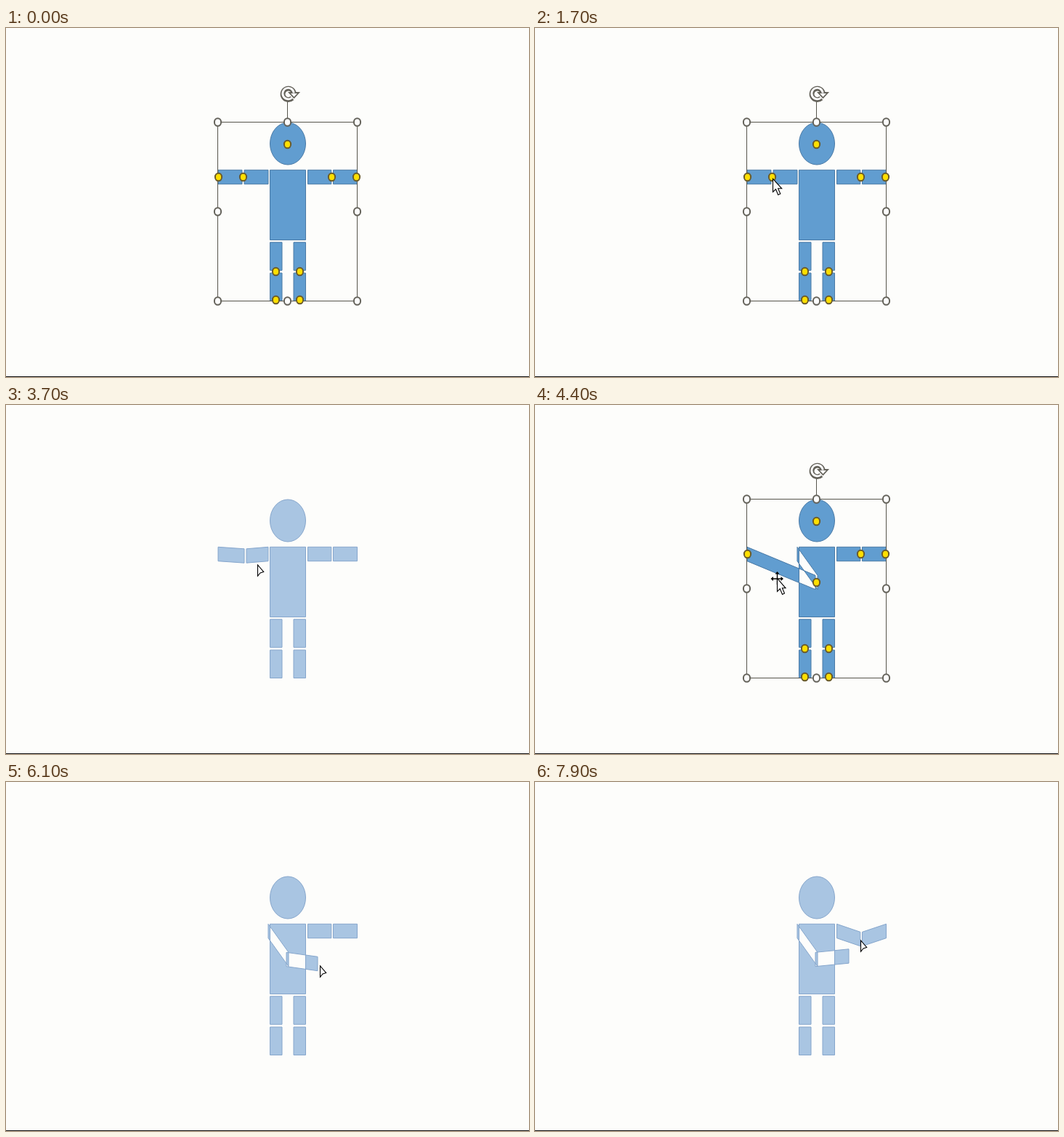
These frames come from a looping animation (720x480 px, 8000 ms). An HTML page:

```html
<!DOCTYPE html>
<html lang="en">
<head>
<meta charset="utf-8">
<title>Posing a figure</title>
<style>
  html, body { margin: 0; width: 100%; height: 100%; overflow: hidden; background: #fdfdfb; }
  svg { display: block; width: 720px; height: 480px; }
  #figure { fill: #619dd0; stroke: #4a7aa6; fill-rule: evenodd; }
  #figure.dragging { fill: #a9c5e2; stroke: #86a6cc; }
  .frame { fill: none; stroke: #57554c; }
  .knob { fill: #fdfdfd; stroke: #64625a; stroke-width: 2; }
  .yellow { fill: #ffdf00; stroke: #6b5c2c; }
  .pointer { fill: #fdfdfd; stroke: #000; stroke-width: 1.1; }
</style>
</head>
<body>
<svg viewBox="0 0 720 480">
  <rect y="479" width="720" height="1" fill="#111"/>
  <path id="figure"/>
  <g id="editor">
    <path class="frame" d="M291.5 129.5H483.5V375.5H291.5ZM387.5 129V102"/>
    <g fill="none">
      <path d="M394 96.5A7.7 7.7 0 1 1 396.2 89" stroke="#64625a" stroke-width="6.8"/>
      <path d="M390 89H403L396.5 96Z" fill="#fdfdfd" stroke="#64625a" stroke-width="1.8"/>
      <path d="M393.5 96A7.7 7.7 0 1 1 396.2 89.5" stroke="#fdfdfd" stroke-width="2.8"/>
    </g>
    <g id="knobs"></g>
  </g>
  <g id="cursor">
    <path class="pointer" data-kind="arrow" d="M.5 .5V18.5L4.5 14.8L7.7 22.4L10.8 21L7.6 13.8H12.7Z"/>
    <path class="pointer" data-kind="head" d="M.5 1V16.3L4 12L8.7 10.5Z"/>
    <g data-kind="move">
      <path d="M-7 1H8M.5 -7V9" stroke="#000" stroke-width="1.4"/>
      <path d="M-8.5 1L-5 -2V4ZM9 1L5.5 -2V4ZM.5 -9L-2.5 -5.5H3.5Z"/>
      <path class="pointer" d="M.5 .5V18.5L4.3 14.8L7.5 22.4L10.5 21L7.4 13.8H12Z"/>
    </g>
  </g>
</svg>
<script>
const LOOP = 8000, STEP = 100, HALF = 9.7;
const byId = id => document.getElementById(id);
const figure = byId('figure'), editor = byId('editor'), cursor = byId('cursor');

// Each stop: time, x, y and, for the cursor, its look from then on.
const cursorPath = [
  [200, 488, 441, 'arrow'], [600, 420, 302, 'arrow'], [1000, 332, 204, 'arrow'],
  [1200, 385, 162, 'arrow'], [1400, 412, 361, 'arrow'], [1700, 327, 207, 'arrow'],
  [2000, 327, 207, 'arrow'], [2400, 362, 224, 'move'], [2700, 370, 227, 'move'],
  [2800, 370, 227, 'move'], [3200, 327, 206, 'head'], [3500, 327, 206, 'head'],
  [3700, 346, 219, 'head'], [4000, 387, 244, 'head'], [4200, 387, 244, 'move'],
  [4400, 333, 238, 'move'], [4600, 291, 208, 'move'], [4800, 292, 205, 'head'],
  [5200, 292, 205, 'head'], [5500, 310, 217, 'head'], [6100, 432, 252, 'head'],
  [6400, 434, 241, 'head'], [6700, 434, 241, 'arrow'], [7300, 448, 206, 'head'],
  [7600, 448, 206, 'head'], [7900, 448, 217, 'head']
];
const elbowPath = [[3500, 326.5, 205], [3700, 329.5, 207.5], [4100, 387.5, 244]];
const wristPath = [[5200, 292, 205], [5500, 308, 214], [6100, 429, 250], [6400, 432, 239.5]];
const rightElbowPath = [[7600, 449, 205], [7900, 449, 216]];
const drags = [[3500, 4200], [5200, 6600], [7600, 8000]];

function at(path, t) {
  let i = path.findIndex(stop => stop[0] > t);
  if (i < 0) i = path.length;
  const a = path[Math.max(i - 1, 0)], b = path[Math.min(i, path.length - 1)];
  const k = a === b ? 0 : (t - a[0]) / (b[0] - a[0]);
  return [a[1] + (b[1] - a[1]) * k, a[2] + (b[2] - a[2]) * k, a[3]];
}

const box = (x, y, w, h) => `M${x} ${y}h${w}v${h}h${-w}Z`;
const limb = (x1, y1, x2, y2) =>
  `M${x1} ${y1 - HALF}L${x2} ${y2 - HALF}V${y2 + HALF}L${x1} ${y1 + HALF}Z`;

const body = 'M363.5 159a24.5 29 0 1 0 49 0a24.5 29 0 1 0 -49 0Z' +
  box(363.5, 195.3, 49, 96.2) +
  [363.5, 396].map(x => box(x, 294.8, 16.5, 38.5) + box(x, 337, 16.5, 38.5)).join('');

function addKnob(x, y, yellow) {
  const knob = document.createElementNS('http://www.w3.org/2000/svg', 'ellipse');
  knob.setAttribute('class', yellow ? 'knob yellow' : 'knob');
  knob.setAttribute('rx', 4.6);
  knob.setAttribute('ry', 5.3);
  byId('knobs').append(knob);
  place(knob, x, y);
  return knob;
}
function place(knob, x, y) {
  knob.setAttribute('cx', x);
  knob.setAttribute('cy', y);
}

for (const x of [291.5, 387.5, 483.5])
  for (const y of [129.5, 252.5, 375.5])
    if (x !== 387.5 || y !== 252.5) addKnob(x, y);
for (const x of [371.5, 404.5])
  for (const y of [335, 374]) addKnob(x, y, true);
addKnob(387.5, 160, true);
addKnob(482.5, 205, true);
const elbowKnob = addKnob(326.5, 205, true);
const wristKnob = addKnob(292.5, 205, true);
const rightElbowKnob = addKnob(448.5, 205, true);

function draw(t) {
  const [ex, ey] = at(elbowPath, t);
  const [wx, wy] = at(wristPath, t);
  const [rx, ry] = at(rightElbowPath, t);
  figure.setAttribute('d', body +
    limb(361, 205, ex + 1.5, ey) + limb(ex - 1.5, ey, wx, wy) +
    limb(415.5, 205, rx - 1.2, ry) + limb(rx + 1.5, ry, 483.5, 205));
  place(elbowKnob, ex, ey);
  place(wristKnob, wx + .5, wy);
  place(rightElbowKnob, rx - .5, ry);

  const dragging = drags.some(([from, to]) => t >= from && t < to);
  figure.classList.toggle('dragging', dragging);
  editor.style.display = dragging ? 'none' : '';

  const [cx, cy, kind] = at(cursorPath, t);
  cursor.style.display = t < 200 ? 'none' : '';
  cursor.setAttribute('transform', `translate(${Math.round(cx)} ${Math.round(cy)})`);
  for (const look of cursor.children)
    look.style.display = look.dataset.kind === kind ? '' : 'none';
}

const start = performance.now();
function tick() {
  const t = (performance.now() - start) % LOOP;
  draw(Math.floor(t / STEP) * STEP);
  requestAnimationFrame(tick);
}
tick();
</script>
</body>
</html>
```
